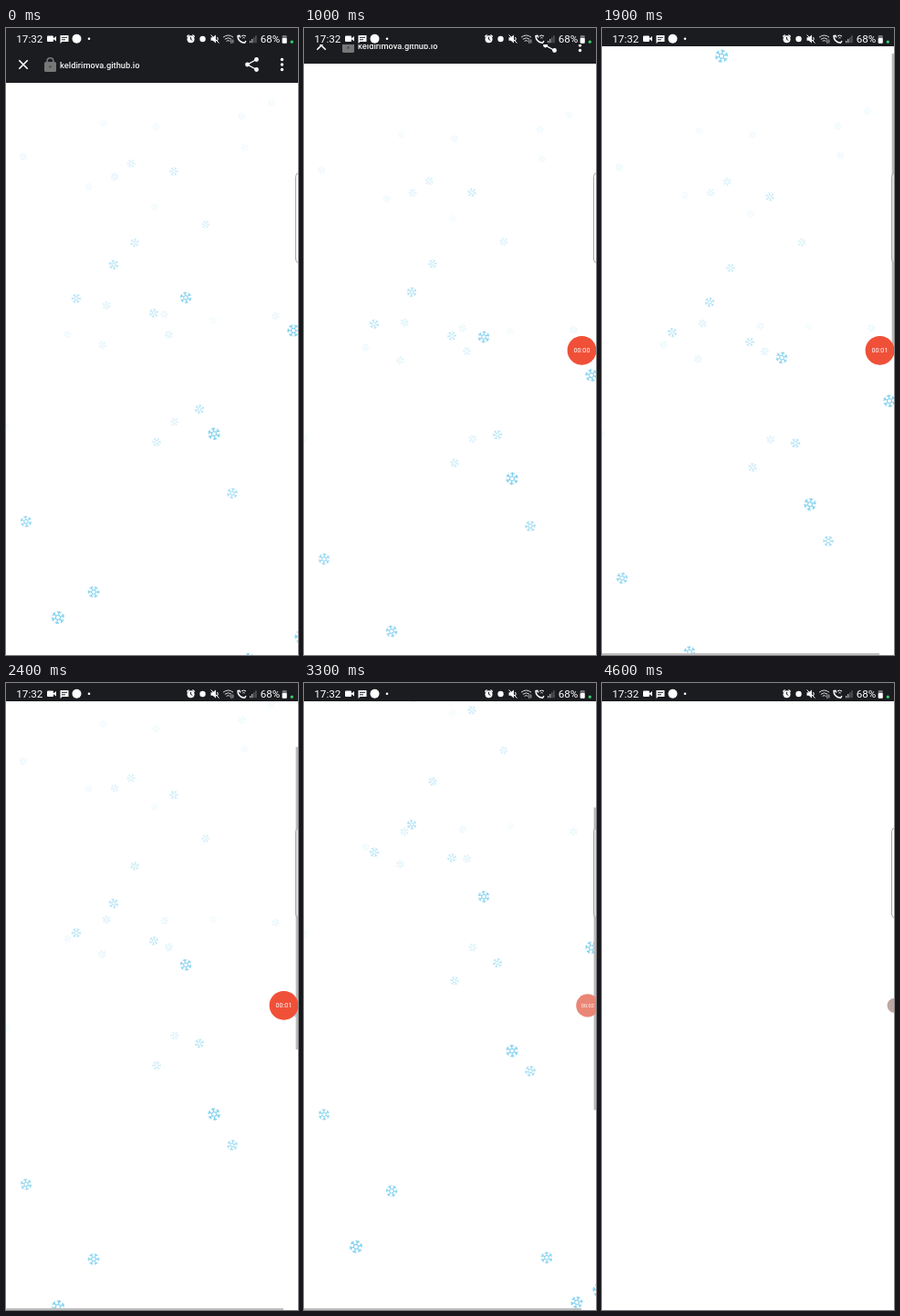
These frames come from a looping animation (320x686 px, 8 s). An HTML page with a canvas:

```html
<!DOCTYPE html>
<html lang="en">
<head>
<meta charset="utf-8">
<title>Snow page</title>
<style>
  html, body { margin: 0; width: 100%; height: 100%; overflow: hidden; background: #fff; }
  canvas { display: block; width: 320px; height: 686px; }
</style>
</head>
<body>
<canvas id="stage"></canvas>
<script>
const W = 320, H = 686, LOOP = 8000, TAU = Math.PI * 2;
const BAR = '#1b1c20', FONT = 'Roboto, "Open Sans", sans-serif';
const STATUS_H = 20, TOOLBAR_END = 60, CLEAR_AT = 4.1;
const canvas = document.getElementById('stage');
const ctx = canvas.getContext('2d');
const dpr = window.devicePixelRatio || 1;
canvas.width = W * dpr;
canvas.height = H * dpr;

const clamp = (v, a = 0, b = 1) => Math.min(b, Math.max(a, v));
const mix = (a, b, k) => a + (b - a) * k;
const ramp = (t, a, b) => clamp((t - a) / (b - a));

let seed = 7;
function random() {
  seed = (seed * 16807) % 2147483647;
  return seed / 2147483647;
}

// Near flakes: x, start y, fall speed in px/s (size and opacity follow from it)
const near = [
  [184, 157, 44], [141, 235, 44], [118, 259, 51], [77, 296, 49], [162, 312, 46],
  [197, 295, 64], [315, 331, 70], [212, 417, 49], [228, 444, 70], [165, 453, 44],
  [248, 509, 57], [22, 540, 62], [96, 617, 64], [57, 645, 74], [266, 690, 64],
  [324, 666, 82], [299, 729, 67], [131, -54, 74]
];
const far = Array.from({ length: 20 }, () =>
  [W * random(), mix(75, 480, random() ** 1.4), mix(33, 41, random() ** 2)]);
const flakes = [...near, ...far];

// The toolbar collapses slowly, then one swipe scrolls on and eases out
function pageOffset(t) {
  const swipe = 1 - (1 - ramp(t, 1.9, 4.1)) ** 1.3;
  return -21 * Math.min(t, 1.75) ** 1.75 - 296 * swipe;
}

function disc(x, y, r, color) {
  ctx.fillStyle = color;
  ctx.beginPath();
  ctx.arc(x, y, r, 0, TAU);
  ctx.fill();
}

function rect(x, y, w, h, color, r = 0) {
  ctx.fillStyle = color;
  ctx.beginPath();
  ctx.roundRect(x, y, w, h, r);
  ctx.fill();
}

function stroke(path, color = '#fff', width = 1) {
  ctx.strokeStyle = color;
  ctx.lineWidth = width;
  ctx.stroke(typeof path === 'string' ? new Path2D(path) : path);
}

function fill(path, color = '#fff') {
  ctx.fillStyle = color;
  ctx.fill(new Path2D(path));
}

function text(str, x, y, size, { color = '#fff', align = 'left', weight = 400 } = {}) {
  ctx.font = `${weight} ${size}px ${FONT}`;
  ctx.textAlign = align;
  ctx.textBaseline = 'alphabetic';
  ctx.fillStyle = color;
  ctx.fillText(str, x, y);
}

// Unit snowflake: six branched arms around an open centre
const flakePath = new Path2D();
for (let i = 0; i < 6; i++) {
  const at = (r, turn) => {
    const a = (i + turn) * TAU / 6;
    return [r * Math.cos(a), r * Math.sin(a)];
  };
  flakePath.moveTo(...at(0.38, 1));
  flakePath.lineTo(...at(0.38, 0));
  flakePath.lineTo(...at(0.98, 0));
  flakePath.moveTo(...at(0.92, -0.3));
  flakePath.lineTo(...at(0.64, 0));
  flakePath.lineTo(...at(0.92, 0.3));
}

function drawFlakes(t, offset) {
  flakes.forEach(([x, y, v], i) => {
    const r = 1.5 + v * 0.08;
    ctx.save();
    ctx.translate(x, y + v * t + offset);
    ctx.rotate(i * 0.7 + t * 1.3);
    ctx.scale(r, r);
    ctx.globalAlpha = clamp((v - 29) / 37, 0.08, 1);
    stroke(flakePath, '#84d2ef', 0.16);
    ctx.restore();
  });
}

function drawToolbar(offset) {
  const bottom = Math.max(STATUS_H, Math.round(TOOLBAR_END + offset));
  rect(0, 0, W, bottom, BAR);
  if (bottom <= STATUS_H) return;
  ctx.save();
  ctx.beginPath();
  ctx.rect(0, 18, W, bottom - 18);
  ctx.clip();
  ctx.translate(0, bottom - 20);
  stroke('M14.3 -4.7L23.7 4.7M23.7 -4.7L14.3 4.7', '#fff', 1.6);
  rect(42, -3, 13, 11, '#777', 1.5);
  stroke('M45.2 -2V-4a3.3 3.3 0 0 1 6.6 0v2', '#777', 1.6);
  disc(48.5, 2.5, 1.4, '#55565a');
  text('keldirimova.github.io', 59, 3.6, 9.3, { color: '#f2f2f2', weight: 500 });
  stroke('M274.5 -5.5L264.5 0L274.5 5.5', '#fff', 1.4);
  disc(264.5, 0, 2.4, '#fff');
  for (const y of [-5.5, 0, 5.5]) {
    if (y) disc(274.5, y, 2.4, '#fff');
    disc(302.5, y, 1.7, '#fff');
  }
  ctx.restore();
}

function drawStatus() {
  text('17:32', 11.3, 15.5, 11.7);
  // camera, message, app dot, more
  rect(45, 8.5, 7, 6.5, '#fff', 1);
  fill('M51.5 11.7L55 9v5.5z');
  fill('M59.5 8h9v7h-7l-2 2z');
  stroke('M61 10.3h6M61 12.8h4', BAR);
  disc(77.5, 11.8, 5, '#fff');
  disc(91, 11.8, 1.3, '#fff');
  // alarm
  disc(202.5, 12.2, 4, '#fff');
  stroke('M198.2 9.5l2.4 -2M206.8 9.5l-2.4 -2', '#fff', 1.2);
  stroke('M202.5 9.8v2.6l1.8 1', BAR);
  disc(215.5, 12, 3.2, '#fff');
  // muted speaker
  fill('M224.5 10.3h2.2l3.2 -2.8v9l-3.2 -2.8h-2.2z');
  stroke('M224.5 7.5l9 9M231.5 10q1.5 2 0 4');
  // wireless
  for (let i = 0; i < 3; i++) {
    const w = 5.5 - i * 1.8;
    stroke(`M${243.5 - w} ${10.2 + i * 2.1}q${w} ${-w * 0.8} ${w * 2} 0`, '#ddd');
  }
  stroke('M246.8 13v4M248.8 12.5v4', '#ddd', 0.8);
  // call
  stroke('M256.8 10.5l-1 -2.2l-1.8 .3q0 7 7.5 7.7l1.4 -2.2', '#fff', 1.5);
  stroke('M258 9q2.5 -2 5 0M259.4 11q1.1 -.9 2.2 0');
  // signal
  for (let i = 0; i < 4; i++) rect(267 + i * 2.1, 14 - i * 1.9, 1.2, 2.2 + i * 1.9, i < 2 ? '#bbb' : '#666');
  text('68%', 278.7, 15.5, 11.6);
  // battery
  rect(302.7, 8, 5, 8.7, '#777', 0.8);
  rect(302.7, 11, 5, 5.7, '#fff', 0.8);
  disc(313.3, 15.2, 1.6, '#35d367');
}

function drawScrollbars(t, offset) {
  const scroll = -offset - (TOOLBAR_END - STATUS_H);
  if (scroll <= 0) return;
  ctx.globalAlpha = 1 - ramp(t, 4.3, 4.6);
  rect(317.6, STATUS_H + scroll / 2, 2.4, 331, '#b9b9b9');
  ctx.globalAlpha = 1;
  if (t < CLEAR_AT) rect(0, 684, 304, 2, '#c0c0c0');
}

function drawHandle() {
  rect(317.5, 158.5, 12, 98.5, 'rgba(255,255,255,.5)', 4);
  ctx.strokeStyle = '#a3a6a8';
  ctx.lineWidth = 1;
  ctx.stroke();
}

// The recording badge turns red, docks at the edge, then slides mostly out
function drawTimer(t) {
  if (t < 0.2) return;
  const y = 352.8, live = t >= 0.6;
  const dock = ramp(t, 2.4, 2.7), hide = ramp(t, 3.8, 4.1);
  const x = mix(mix(304.5, 310.8, dock), 320.5, hide);
  const r = mix(mix(15.9, 12.6, dock), 8, hide);
  const fade = ramp(t, 0.1, 0.3);
  ctx.globalAlpha = fade;
  disc(x, y, r, live ? `hsl(8 ${mix(mix(86, 73, dock), 16, hide)}% ${mix(58, 69, dock)}%)` : '#555');
  ctx.globalAlpha = fade * (1 - hide);
  const seconds = clamp(Math.floor(t - 0.6 + 1e-6), 0, 3);
  text('00:0' + seconds, x, y + r * 0.16, r * 0.45, { color: live ? '#fff' : '#ddd', align: 'center' });
  ctx.globalAlpha = 1;
}

function draw(t) {
  const offset = pageOffset(t);
  ctx.setTransform(dpr, 0, 0, dpr, 0, 0);
  rect(0, 0, W, H, '#fff');
  if (t < CLEAR_AT) drawFlakes(t, offset);
  drawScrollbars(t, offset);
  drawToolbar(offset);
  drawStatus();
  drawHandle();
  drawTimer(t);
}

const start = performance.now();
function tick() {
  const ms = (performance.now() - start) % LOOP;
  draw(Math.floor(ms / 100) / 10);
  requestAnimationFrame(tick);
}
tick();
</script>
</body>
</html>
```
